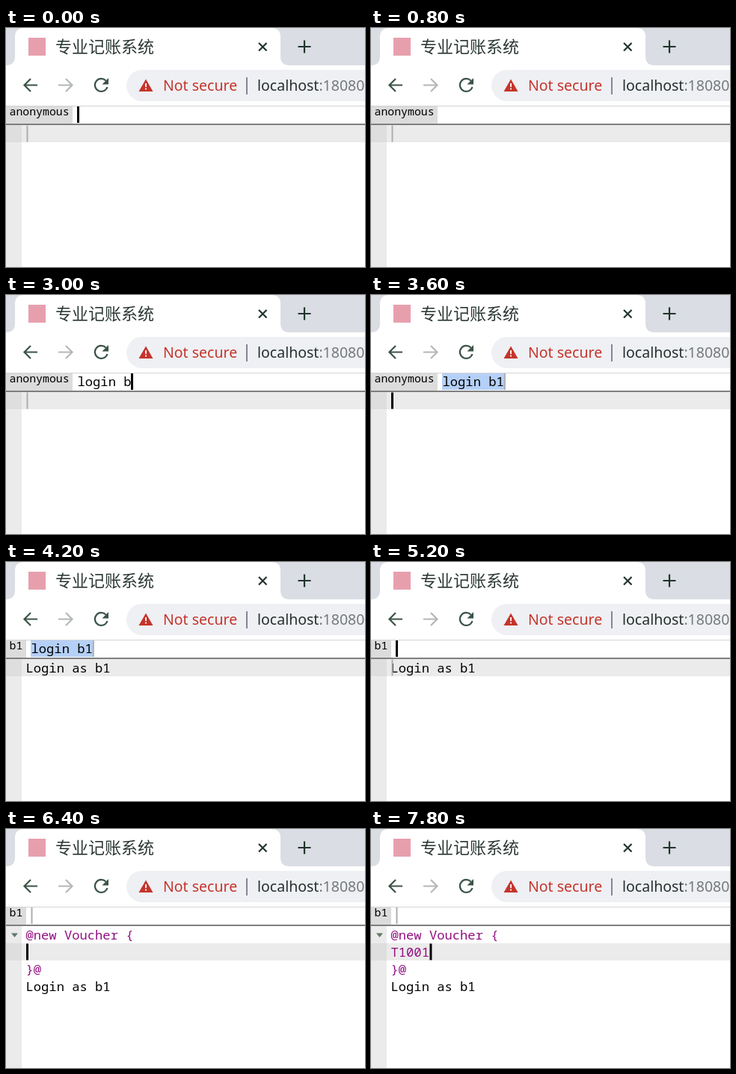
An HTML page for the animation above (8 s loop, 480x320 px).

```html
<!DOCTYPE html>
<html lang="zh">
<head>
<meta charset="utf-8">
<style>
html, body { margin: 0; width: 100%; height: 100%; overflow: hidden; background: #fff; }
svg { display: block; width: 480px; height: 320px; }
text { white-space: pre; }
.title { font: 22px "Noto Sans CJK SC", "Noto Sans CJK", sans-serif; fill: #2b3832; }
.ui { font: 19.5px "Noto Sans", sans-serif; }
.code { font: 17.15px "Noto Sans Mono", monospace; }
.prompt { font: 14.85px "Noto Sans Mono", monospace; }
.key { fill: #930f80; }
.icon { fill: none; stroke: #3b5347; stroke-width: 2.2; }
</style>
</head>
<body>
<svg viewBox="0 0 480 320">
  <!-- tab strip -->
  <rect width="480" height="50" fill="#dadde3"/>
  <path d="M0 50Q12 50 12 38V12Q12 0 24 0H355Q367 0 367 12V38Q367 50 379 50Z" fill="#fff"/>
  <rect x="30" y="13" width="23" height="24" fill="#e79fae"/>
  <text class="title" x="66" y="33">专业记账系统</text>
  <path class="icon" d="M338 20l10.500 10.500m0-10.500l-10.500 10.500M399 16.500v17M390.500 25h17" style="stroke:#22352b"/>

  <!-- toolbar -->
  <path class="icon" d="M42 76.500H25M33 68l-8.500 8.500l8.500 8.500"/>
  <path class="icon" d="M70 76.500H88M80 68l8.500 8.500l-8.500 8.500" style="stroke:#b4b8b6"/>
  <path class="icon" d="M133.500 70.500A8.500 8.500 0 1 0 135.500 79"/>
  <path d="M137 67v8.500h-8.500Z" fill="#3b5347"/>
  <rect x="161" y="56" width="360" height="42" rx="21" fill="#eff0f4"/>
  <path d="M187 68.500L196.500 85H177.500Z" fill="#c5342b"/>
  <path d="M187 74v5m0 1.500v2" stroke="#fff" stroke-width="1.800"/>
  <text class="ui" x="210" y="84" fill="#c5342b">Not secure</text>
  <rect x="321" y="66" width="2" height="23" fill="#85859c"/>
  <text class="ui" x="336" y="84" fill="#26302c">localhost<tspan fill="#74797b">:18080</tspan></text>
  <rect y="104" width="480" height="1" fill="#d4d4d4"/>

  <!-- command line -->
  <rect id="promptBox" y="105" height="23" fill="#dcdcdc"/>
  <text id="prompt" class="prompt" x="4.500" y="117"></text>
  <rect id="selection" y="105" height="22" fill="#b5d0f8"/>
  <text id="command" class="code" y="122"></text>
  <rect id="commandCursor" y="105" height="22"/>
  <rect y="128" width="480" height="2" fill="#7f7f7f"/>

  <!-- editor -->
  <rect y="130" width="21" height="190" fill="#ebebeb"/>
  <rect id="activeGutter" width="21" height="23" fill="#dedede"/>
  <rect id="activeLine" x="21" width="459" height="23" fill="#ebebeb"/>
  <g id="voucher" class="code key">
    <path d="M7 139.500h9l-4.500 5.500Z" fill="#5f7a66"/>
    <text x="26.500" y="148">@new Voucher {</text>
    <text id="entry" x="26.500" y="171"></text>
    <text x="26.500" y="194">}@</text>
  </g>
  <text id="output" class="code" x="26.500">Login as b1</text>
  <rect id="editorCursor" height="22"/>
</svg>
<script>
const LOOP = 8000, STEP = 200, CHAR = 10.29, ROW = 23;
const COMMAND = "login b1", ENTRY = "T1001";
const COMMAND_START = 1800, ENTER = 3600, LOGGED_IN = 3800, REPLY = 4000;
const CLEAR = 4800, INSERT = 5400, ENTRY_START = 7000;

const el = id => document.getElementById(id);
const set = (id, attrs) => {
  for (const name in attrs) el(id).setAttribute(name, attrs[name]);
};
const show = (id, on) => set(id, { visibility: on ? "visible" : "hidden" });
const keys = (text, start) => [...text].map((_, i) => start + i * STEP);
const typed = (text, start, t) =>
  text.slice(0, Math.max(0, Math.floor((t - start) / STEP) + 1));

// Each key press or focus change restarts the blink: 600 ms on, 400 ms off.
const restarts = [200, ...keys(COMMAND, COMMAND_START), ENTER, CLEAR, INSERT,
  ...keys(ENTRY, ENTRY_START)];
const blink = t => (t - (restarts.filter(r => r <= t).pop() ?? 0)) % 1000 < 600;

function cursor(id, x, focused, t) {
  set(id, { x: focused ? x : x + 0.5, width: focused ? 3 : 2, fill: focused ? "#000" : "#adadad" });
  show(id, !focused || blink(t));
}

function draw(t) {
  const loggedIn = t >= LOGGED_IN, inserted = t >= INSERT;
  const promptWidth = loggedIn ? 27 : 89;
  const commandX = promptWidth + 6;
  const command = t < CLEAR ? typed(COMMAND, COMMAND_START, t) : "";
  const entry = typed(ENTRY, ENTRY_START, t);
  const inCommand = t < ENTER || t >= CLEAR && !inserted;
  const lineY = 130 + (inserted ? ROW : 0);

  el("prompt").textContent = loggedIn ? "b1" : "anonymous";
  set("promptBox", { width: promptWidth });
  el("command").textContent = command;
  set("command", { x: commandX + 0.5 });
  set("selection", { x: commandX, width: COMMAND.length * CHAR + 1 });
  show("selection", t >= ENTER && t < CLEAR);
  cursor("commandCursor", commandX + command.length * CHAR, inCommand, t);

  set("activeGutter", { y: lineY });
  set("activeLine", { y: lineY });
  show("voucher", inserted);
  el("entry").textContent = entry;
  set("output", { y: inserted ? 217 : 148 });
  show("output", t >= REPLY);
  set("editorCursor", { y: lineY + 0.5 });
  cursor("editorCursor", 27 + entry.length * CHAR, !inCommand, t);
}

let start;
function frame(now) {
  start ??= now;
  draw((now - start) % LOOP);
  requestAnimationFrame(frame);
}
draw(0);
requestAnimationFrame(frame);
</script>
</body>
</html>
```
